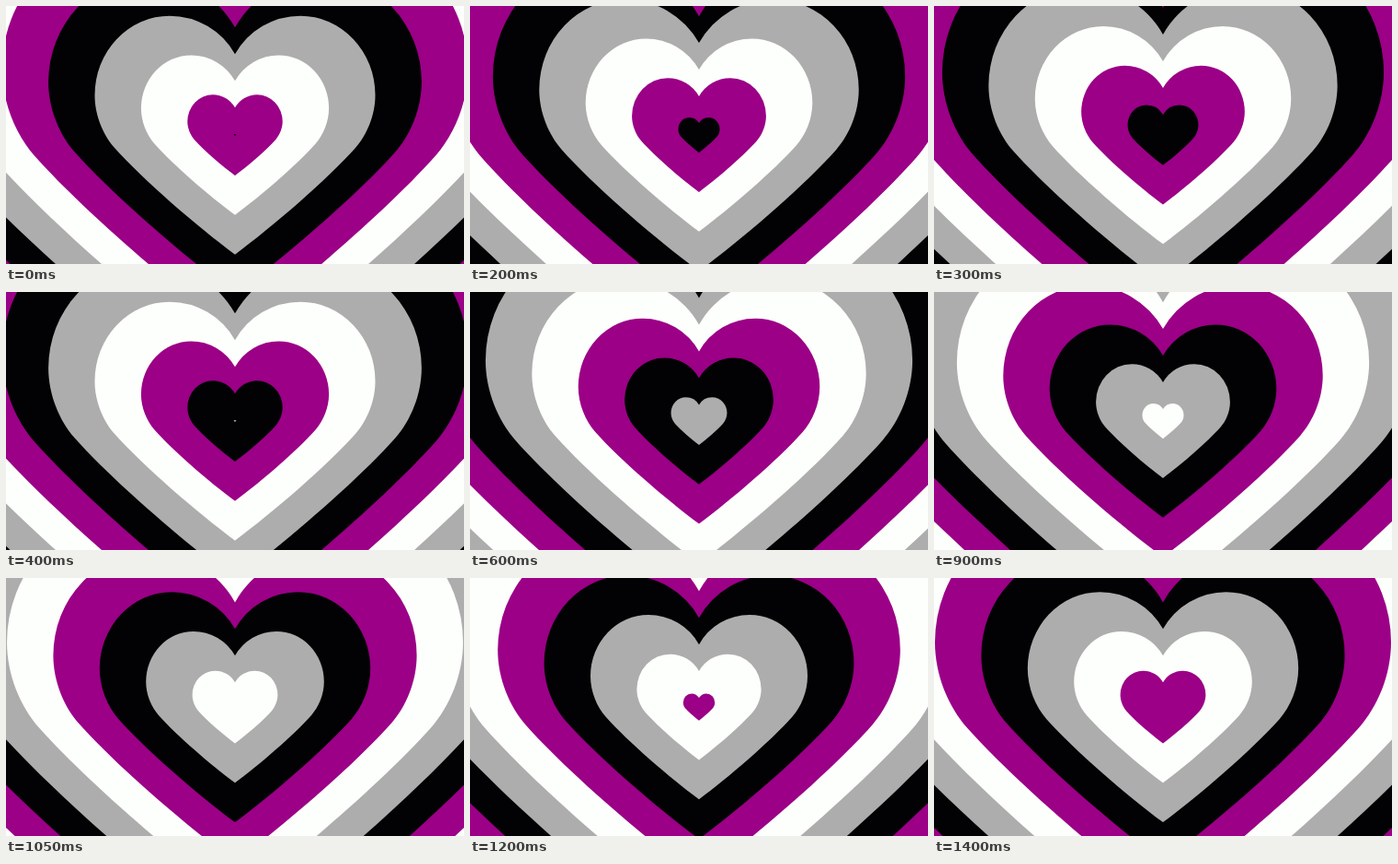
These frames come from a looping animation (498x280 px, 1.45 s). An HTML page with a canvas:

```html
<!DOCTYPE html>
<html lang="en">
<head>
<meta charset="utf-8">
<title>Growing hearts</title>
<style>
  html, body { margin: 0; width: 100%; height: 100%; overflow: hidden; background: #020103; }
  canvas { display: block; width: 498px; height: 280px; }
</style>
</head>
<body>
<canvas id="stage" width="498" height="280"></canvas>
<script>
const ctx = document.getElementById('stage').getContext('2d');

const COLORS = ['#020103', '#adadad', '#fdfffc', '#9b0086'];
const TICK = 50;        // ms per pose
const TICKS = 29;       // poses per loop
const GAP = 19;         // growth units between two hearts
const UNIT = 50.4 / GAP; // half-width gained per unit
const RINGS = 10;

// Heart with half-width 1, centred on the point it grows from:
// round lobes, a tight bend at the side, then nearly straight flanks.
const heart = new Path2D(
  'M0 -.575' +
  'A.534 .534 0 0 0 -.466 -.848' +
  'A.534 .565 0 0 0 -1 -.283' +
  'C-1 -.14 -.94 0 -.86 .09' +
  'C-.655 .32 -.27 .65 0 .85' +
  'C.27 .65 .655 .32 .86 .09' +
  'C.94 0 1 -.14 1 -.283' +
  'A.534 .565 0 0 0 .466 -.848' +
  'A.534 .534 0 0 0 0 -.575Z'
);

const mod = (a, n) => ((a % n) + n) % n;

function drawHeart(index, size) {
  ctx.setTransform(size, 0, 0, size, 249, 140);
  ctx.fillStyle = COLORS[mod(index, COLORS.length)];
  ctx.fill(heart);
}

function draw(time) {
  const tick = Math.floor(time / TICK) % TICKS;
  const step = Math.max(0, tick - 1); // the first pose is held for two ticks
  const grown = Math.floor(step * GAP / 7 + 0.8);
  const newest = Math.floor(grown / GAP);

  ctx.setTransform(1, 0, 0, 1, 0, 0);
  ctx.fillStyle = COLORS[mod(newest - RINGS, COLORS.length)];
  ctx.fillRect(0, 0, 498, 280);
  for (let i = newest - RINGS + 1; i <= newest; i++) {
    drawHeart(i, 1.3 + (grown - i * GAP) * UNIT);
  }
}

function loop() {
  draw(performance.now());
  requestAnimationFrame(loop);
}
loop();
</script>
</body>
</html>
```
